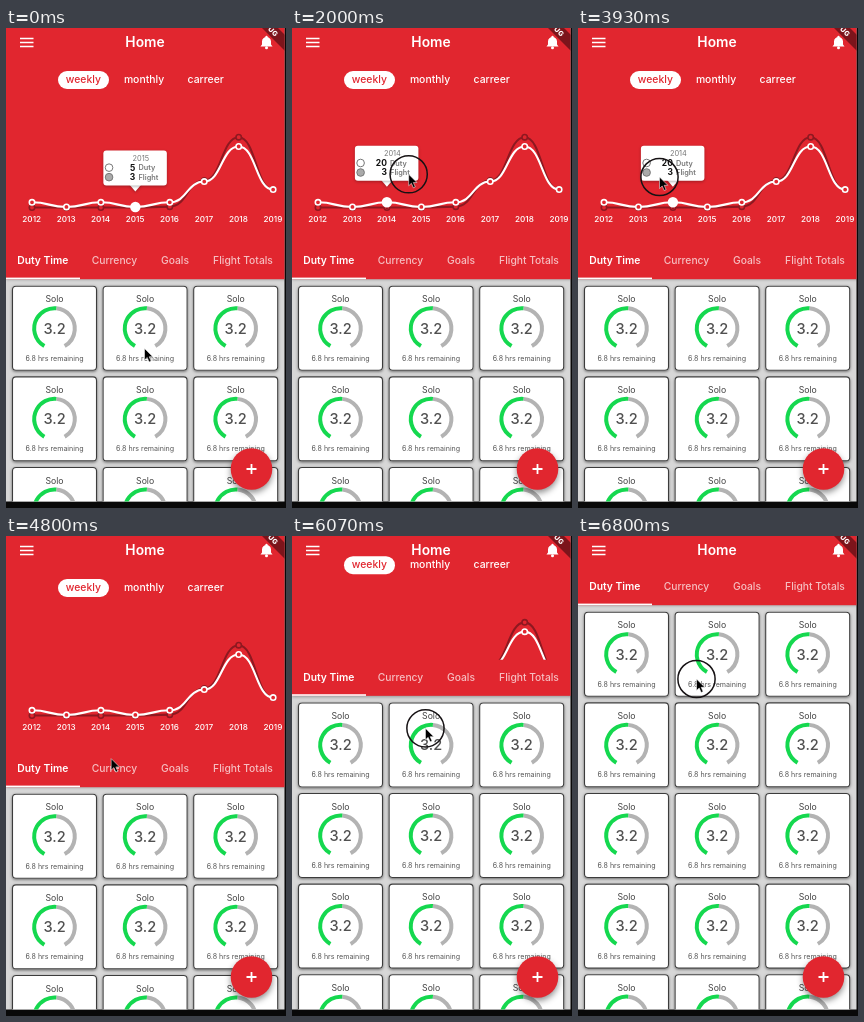
These frames come from a looping animation (280x480 px, 6870 ms). An HTML page with a canvas:

```html
<!DOCTYPE html>
<html lang="en">
<head>
<meta charset="utf-8">
<title>Duty dashboard</title>
<style>
html, body { margin: 0; width: 100%; height: 100%; overflow: hidden; background: #090909; }
canvas { display: block; }
</style>
</head>
<body>
<canvas id="stage" width="280" height="480"></canvas>
<script>
const c = document.getElementById('stage').getContext('2d');
const LOOP = 6870, COLLAPSE = 182, STEP = 34.45, PITCH = 90.6;
const RED = '#e1262f', DARK = '#8e1820', WHITE = '#fff';
const TAU = Math.PI * 2;

const duty = [20, 5, 20, 5, 20, 87, 200, 61];
const flight = [3, 3, 3, 3, 6, 90, 230, 61];
const pointX = i => 26 + STEP * i;
const valueY = v => 180.5 - .31 * v;

// Pointer stops: time, x, y
const stops = [[1400, 138.5, 320.5], [1700, 84, 146], [2870, 211, 147], [3000, 211, 150],
  [3930, 81.5, 149], [4530, 81.5, 149], [5200, 140, 331], [5400, 140, 313.5],
  [5700, 140, 300], [6070, 133.5, 192.5], [6400, 118.5, 143]];

const clamp = u => Math.min(1, Math.max(0, u));
const smooth = u => (u = clamp(u)) * u * (3 - 2 * u);

function pointerAt(t) {
  const next = stops.findIndex(s => s[0] > t);
  const i = next < 0 ? stops.length - 1 : Math.max(1, next);
  const [t0, x0, y0] = stops[i - 1], [t1, x1, y1] = stops[i];
  const u = clamp((t - t0) / (t1 - t0));
  return [x0 + (x1 - x0) * u, y0 + (y1 - y0) * u];
}

// The tooltip follows the pointer with a short delay while the chart is touched
function pickAt(t) {
  if (t < 1700) return 3;
  if (t > 4700) return -1;
  return Math.round((pointerAt(t - 60)[0] - pointX(0)) / STEP);
}

function text(str, x, y, size, color, weight = 500, align = 'center') {
  c.font = `${weight} ${size}px Inter, sans-serif`;
  c.fillStyle = color;
  c.textAlign = align;
  c.textBaseline = 'middle';
  c.fillText(str, x, y + .4);
}

function box(x, y, w, h, r, fill) {
  c.beginPath();
  c.roundRect(x, y, w, h, r);
  c.fillStyle = fill;
  c.fill();
}

function disc(x, y, r, fill, stroke, width = 1) {
  c.beginPath();
  c.arc(x, y, r, 0, TAU);
  c.fillStyle = fill;
  c.fill();
  if (stroke) line(stroke, width);
}

function line(color, width) {
  c.strokeStyle = color;
  c.lineWidth = width;
  c.stroke();
}

function segment(x1, y1, x2, y2, color, width) {
  c.beginPath();
  c.moveTo(x1, y1);
  c.lineTo(x2, y2);
  line(color, width);
}

function polygon(points, fill) {
  c.beginPath();
  points.forEach(p => c.lineTo(...p));
  c.closePath();
  c.fillStyle = fill;
  c.fill();
}

function shadowed(color, blur, dy, draw) {
  c.save();
  c.shadowColor = color;
  c.shadowBlur = blur;
  c.shadowOffsetY = dy;
  draw();
  c.restore();
}

function clipped(x, y, w, h, draw) {
  c.save();
  c.beginPath();
  c.rect(x, y, w, h);
  c.clip();
  draw();
  c.restore();
}

function arc(x, y, from, to, color) {
  c.beginPath();
  c.arc(x, y, 20.3, from * TAU / 360, to * TAU / 360);
  line(color, 4);
}

function card(x, y) {
  const mid = x + 42.5;
  shadowed('rgba(0,0,0,.5)', 3, 1, () => box(x, y, 85, 85, 4, WHITE));
  c.beginPath();
  c.roundRect(x + .5, y + .5, 84, 84, 3.5);
  line('#3c3c3c', 1.1);
  text('Solo', mid, y + 13.6, 8.7, '#444', 400);
  arc(mid, y + 42.7, 275, 420, '#b3b3b3');
  arc(mid, y + 42.7, 120, 275, '#15d84f');
  text('3.2', mid, y + 43, 14.6, '#505050');
  text('6.8 hrs remaining', mid, y + 72.4, 7.1, '#555', 400);
}

function series(values, color) {
  const half = STEP / 2;
  c.beginPath();
  values.forEach((v, i) => {
    const x = pointX(i), y = valueY(v);
    if (i) c.bezierCurveTo(x - half, valueY(values[i - 1]), x - half, y, x, y);
    else c.moveTo(x, y);
  });
  line(color, 2.1);
  values.forEach((v, i) => disc(pointX(i), valueY(v), 2.7, RED, color, 1.6));
}

function tooltip(i) {
  const x = pointX(i), y = valueY(duty[i]), top = y - 56.5, left = x - 32;
  segment(x, y, x, 181, DARK, 2);
  disc(x, y, 5.2, WHITE);
  shadowed('rgba(0,0,0,.3)', 3, 1, () => {
    polygon([[x - 6, top + 34], [x + 6, top + 34], [x, top + 41]], WHITE);
    box(left, top, 63.5, 35, 3, WHITE);
  });
  text(2012 + i, x + 5.5, top + 7.5, 7.4, '#777', 400);
  [['Duty', duty], ['Flight', flight]].forEach(([name, values], n) => {
    const row = top + 17.2 + n * 9.5;
    disc(left + 5.7, row, 3.8, n ? '#aaa' : WHITE, '#777', 1);
    text(values[i], x, row, 8.5, '#111', 700, 'right');
    text(name, x + 3.2, row, 7.3, '#777', 600, 'left');
  });
}

function chart(pick) {
  box(52, 43, 51, 18, 9, WHITE);
  text('weekly', 77.3, 51.8, 10.4, RED);
  text('monthly', 138, 51.8, 10.4, WHITE);
  text('carreer', 199.7, 51.8, 10.4, WHITE);
  series(flight, DARK);
  series(duty, WHITE);
  duty.forEach((_, i) => text(2012 + i, pointX(i) - .3, 191.6, 8.2, WHITE));
  if (pick >= 0) tooltip(pick);
}

function bell(x, y) {
  c.beginPath();
  c.moveTo(x - 6, y + 4);
  c.lineTo(x - 4.5, y + 2);
  c.lineTo(x - 4.5, y - 1);
  c.bezierCurveTo(x - 4.5, y - 7, x + 4.5, y - 7, x + 4.5, y - 1);
  c.lineTo(x + 4.5, y + 2);
  c.lineTo(x + 6, y + 4);
  c.fillStyle = WHITE;
  c.fill();
  disc(x, y - 5.5, 1.2, WHITE);
  disc(x, y + 5.3, 1.5, WHITE);
}

function header(scroll, pick) {
  const bottom = 251.2 - scroll;
  shadowed('rgba(0,0,0,.3)', 3, 1, () => {
    c.fillStyle = RED;
    c.fillRect(0, 0, 280, bottom);
  });

  clipped(0, 0, 280, bottom - 36, () => {
    c.globalAlpha = clamp((1 - scroll / COLLAPSE) * 5);
    c.translate(0, -scroll / 4);
    chart(pick);
  });

  for (const y of [10.5, 14.5, 18.5]) segment(14, y, 27.5, y, WHITE, 1.5);
  text('Home', 139, 14.7, 13.8, WHITE, 600);
  bell(260.5, 14.4);

  const tabY = bottom - 18.4, faded = 'rgba(255,255,255,.7)';
  text('Duty Time', 36.8, tabY, 10.3, WHITE, 600);
  text('Currency', 108.5, tabY, 10.3, faded);
  text('Goals', 169, tabY, 10.3, faded);
  text('Flight Totals', 237, tabY, 10.3, faded);
  c.fillStyle = WHITE;
  c.fillRect(0, bottom - 1.6, 74, 1.6);
}

function ribbon() {
  polygon([[256, 0], [272, 0], [280, 8], [280, 24]], '#7c141b');
  c.save();
  c.translate(267, 3.5);
  c.rotate(TAU / 8);
  text('UG', 0, 0, 7, WHITE, 800);
  c.restore();
}

function addButton(x, y) {
  shadowed('rgba(0,0,0,.45)', 6, 3, () => disc(x, y, 20.8, RED));
  segment(x - 5, y, x + 5, y, WHITE, 1.8);
  segment(x, y - 5, x, y + 5, WHITE, 1.8);
}

function pointer(x, y, pressed) {
  if (pressed) disc(x, y, 18.6, 'transparent', '#161214', 1.5);
  c.save();
  c.translate(x, y);
  polygon([[0, 0], [0, 11.5], [2.7, 9], [4.7, 13.5], [6.6, 12.6], [4.7, 8.3], [8.3, 8.3]], '#000');
  line('rgba(255,255,255,.75)', .7);
  c.restore();
}

function draw(t) {
  const scroll = COLLAPSE * smooth((t - 5700) / 740);
  c.fillStyle = '#090909';
  c.fillRect(0, 0, 280, 480);
  clipped(0, 0, 278.5, 473.5, () => {
    c.fillStyle = '#d7d7d7';
    c.fillRect(0, 0, 280, 480);
    for (let row = 0; row < 5; row++)
      for (let col = 0; col < 3; col++)
        card(6 + col * PITCH, 257.8 - scroll + row * PITCH);
    header(scroll, pickAt(t));
    ribbon();
    addButton(245.5, 441);
  });
  const pressed = t > 1650 && t < 4700 || t > 5680;
  pointer(...pointerAt(t), pressed);
}

const start = performance.now();
function tick() {
  draw((performance.now() - start) % LOOP);
  requestAnimationFrame(tick);
}
tick();
</script>
</body>
</html>
```
